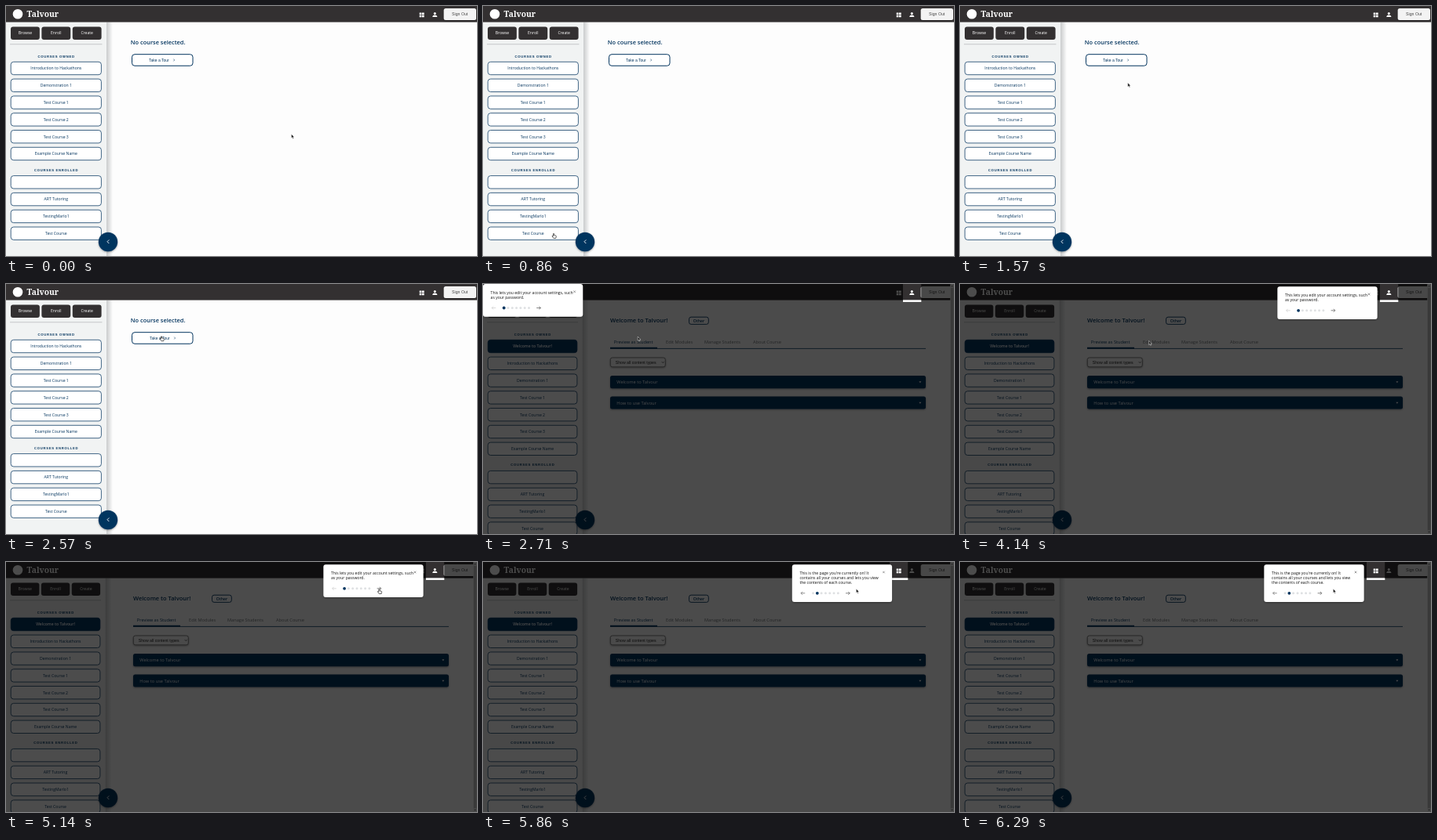
An HTML page that plays this animation: 600 px wide and 319 px high, repeating every 8000 ms.

```html
<!DOCTYPE html>
<html lang="en">
<head>
<meta charset="utf-8">
<title>Course tour</title>
<style>
  html, body { margin: 0; width: 100%; height: 100%; overflow: hidden; background: #fdfdfd; }
  svg { display: block; width: 100vw; height: 100vh; }
  text { font-family: "Open Sans", "Noto Sans", sans-serif; white-space: pre; }
  .arial { font-family: "Liberation Sans", Arial, sans-serif; }
  .brand { font-family: "Noto Serif", serif; font-weight: 700; }
  .head { font-weight: 700; letter-spacing: .7px; }
  .bold { font-weight: 600; }
</style>
</head>
<body>
<svg id="stage" viewBox="0 0 600 319" preserveAspectRatio="none" xmlns="http://www.w3.org/2000/svg"></svg>
<script>
const NAVY = '#04355f', DARK = '#333031', LOOP = 8000, STEP = 1000 / 7;
const stage = document.getElementById('stage');

const rect = (x, y, w, h, fill, r = 0, extra = '') =>
  `<rect x="${x}" y="${y}" width="${w}" height="${h}" rx="${r}" fill="${fill}" ${extra}/>`;
const line = (d, color, w = .7) =>
  `<path d="${d}" fill="none" stroke="${color}" stroke-width="${w}"/>`;
// y is the middle of the line of text
const text = (s, x, y, size, fill, cls = '', anchor = 'start') =>
  `<text x="${x}" y="${y + size * .36}" font-size="${size}" fill="${fill}" class="${cls}" text-anchor="${anchor}">${s}</text>`;
const mid = (s, x, y, size, fill, cls) => text(s, x, y, size, fill, cls, 'middle');
const group = (id, body) => `<g id="${id}">${body}</g>`;

const owned = ['Introduction to Hackathons', 'Demonstration 1', 'Test Course 1',
  'Test Course 2', 'Test Course 3', 'Example Course Name'];
const enrolled = ['', 'ART Tutoring', 'TestingMarlo1', 'Test Course'];

function header(signW) {
  const squares = [[526.7, 8.5], [530, 8.5], [526.7, 11.7], [530, 11.7]]
    .map(([x, y]) => rect(x, y, 2.7, 2.6, '#fff')).join('');
  return rect(0, 0, 600, 20.6, DARK) +
    '<circle cx="15" cy="10.3" r="6.3" fill="#fff"/>' +
    text('Talvour', 26.5, 10.3, 10.2, '#fff', 'brand') + squares +
    '<circle cx="546.3" cy="9.6" r="1.5" fill="#fff"/>' +
    '<path d="M543.3 14v-.8q.3-1.6 3-1.6t3 1.6v.8z" fill="#fff"/>' +
    rect(557.7, 3, signW, 15, '#f3f3f3', 2.5, 'filter="url(#soft)"') +
    mid('Sign Out', 578.2, 10.4, 5.2, '#444', 'arial');
}

function sidebar(width, courses, active) {
  const w = width - 12.4, cx = 6 + w / 2, pitch = 21.8;
  const bw = (w - 5) / 3;
  let s = rect(width, 20.6, 8, 299, 'url(#edge)') + rect(0, 20.6, width, 299, '#f1f3f3');
  ['Browse', 'Enroll', 'Create'].forEach((name, i) => {
    const x = 6 + i * (bw + 2.5);
    s += rect(x, 26.4, bw, 16.6, DARK, 3) + mid(name, x + bw / 2, 34.6, 5.1, '#fff');
  });
  s += line(`M5 48.8H${width - 5.5}`, '#b9bcbe', .8);
  const item = (name, y) => {
    const on = name === active;
    s += rect(6.2, y - 8.2, w - .4, 16.4, on ? NAVY : '#fff', 3.5, `stroke="${NAVY}" stroke-width=".75"`) +
      mid(name, cx, y, 5.1, on ? '#fff' : NAVY, on ? 'bold' : '');
  };
  let y = 79.5;
  s += mid('COURSES OWNED', cx + .3, 64, 4.2, NAVY, 'arial head');
  courses.forEach(c => { item(c, y); y += pitch; });
  s += mid('COURSES ENROLLED', cx + .3, y - 1.2, 4.2, NAVY, 'arial head');
  y += 14.5;
  enrolled.forEach(c => { item(c, y); y += pitch; });
  return s + `<circle cx="130" cy="301" r="12.2" fill="${NAVY}" filter="url(#soft)"/>` +
    line('M131.3 298.4L129 300.7L131.3 303', '#fff', .9);
}

function emptyPage() {
  return rect(0, 0, 600, 319, '#fdfdfd') + sidebar(128, owned) + header(41.3) +
    text('No course selected.', 158.8, 46, 7.4, NAVY, 'bold') +
    rect(160.5, 61.7, 77.5, 14.6, '#fff', 3.5, `stroke="${NAVY}"`) +
    group('tourLabel', text('Take a Tour', 182, 69, 5, NAVY, 'arial') +
      line('M213.4 67.6L214.7 69L213.4 70.4', NAVY, .6));
}

function coursePage() {
  const title = 'Welcome to Talvour!';
  const tabs = [['Preview as Student', 166.8], ['Edit Modules', 233], ['Manage Students', 282], ['About Course', 344]];
  const panel = (name, y) => rect(162, y, 402, 16.2, NAVY, 2.5, 'filter="url(#soft)"') +
    text(name, 170.3, y + 8.1, 5.7, '#fff') +
    `<path d="M555.4 ${y + 7.3}h3l-1.5 2z" fill="#fff"/>`;
  return rect(0, 0, 600, 319, '#fdfdfd') + sidebar(126.5, [title, ...owned], title) + header(39.3) +
    text(title, 162, 46, 7.5, NAVY, 'bold') +
    rect(262.5, 42.2, 24.8, 9.2, '#fff', 2.6, `stroke="${NAVY}" stroke-width=".9"`) +
    mid('Other', 274.9, 46.8, 5.1, NAVY, 'bold') +
    tabs.map(([s, x], i) => text(s, x, 74.2, 5.65, i ? '#6f7478' : NAVY)).join('') +
    line('M162 82.4H564', NAVY, .8) + line('M162 81.7H222', NAVY, 1.8) +
    rect(162.3, 94, 70, 11.8, '#f8f8f8', 2.5, 'stroke="#555" stroke-width=".7" filter="url(#soft)"') +
    text('Show all content types', 168.7, 99.9, 5.2, '#222', 'arial') +
    line('M227.8 99.2l1.4 1.4l1.4-1.4', '#222', .7) +
    panel('Welcome to Talvour', 117) + panel('How to use Talvour', 143.4) +
    rect(595.2, 0, 4.8, 319, '#f1f1f1') + rect(595.8, 5, 3.6, 309, '#c1c1c1') +
    '<path d="M596.4 3.3h2.4l-1.2-1.6zM596.4 315.8h2.4l-1.2 1.6z" fill="#555"/>';
}

function tip(lines, step, h) {
  const ny = h - 11.3;
  let s = rect(0, 0, 127.2, h, '#fff', 3, 'filter="url(#soft)"');
  lines.forEach((l, i) => { s += text(l, 9.6, 10.8 + i * 6, 5.07, '#111'); });
  s += line('M115.3 8.4l2.6 2.6m0-2.6l-2.6 2.6', '#555', .55);
  s += line(`M16.4 ${ny}h-5.2m2-2l-2 2l2 2`, step ? '#666' : '#ccc', .7);
  s += line(`M68.2 ${ny}h5.2m-2-2l2 2l-2 2`, '#555', .7);
  for (let i = 0; i < 7; i++) {
    const on = i === step;
    s += `<circle cx="${26.7 + i * 5.3}" cy="${ny}" r="${on ? 1.9 : 1.5}" fill="${on ? NAVY : '#dfe1e3'}"/>`;
  }
  return s;
}

stage.innerHTML = `<defs>
  <linearGradient id="edge"><stop offset="0" stop-color="#c9cbcc"/><stop offset="1" stop-color="#fdfdfd"/></linearGradient>
  <filter id="soft" x="-20%" y="-40%" width="140%" height="190%">
    <feDropShadow dx="0" dy="1" stdDeviation="1.3" flood-opacity=".35"/></filter></defs>` +
  group('empty', emptyPage()) +
  group('tour', coursePage() + '<path id="mask" fill="#000" fill-opacity=".7" fill-rule="evenodd"/>' +
    group('strip', rect(0, 20.6, 23.2, 2.2, '#fff')) +
    group('tip0', tip(['This lets you edit your account settings, such', 'as your password.'], 0, 41.8)) +
    group('tip1', tip(['This is the page you\'re currently on! It',
      'contains all your courses and lets you view', 'the contents of each course.'], 1, 47.8))) +
  group('arrow', '<path d="M0 0V5.2L1.2 4.1L2 6L2.9 5.6L2.1 3.8H3.7Z" fill="#111" stroke="#fff" stroke-width=".45"/>') +
  group('hand', '<path d="M-.6 .6Q0-.3 .6 .6V2.6L2.6 3Q3.5 3.2 3.3 4.2L2.8 6.3H-.1L-1.9 3.9Q-2 3 -1.2 3.3L-.6 3.9Z" fill="#fff" stroke="#111" stroke-width=".65"/>');

const el = id => document.getElementById(id);
const [empty, tour, mask, strip, tip0, tip1, arrow, hand, tourLabel] =
  ['empty', 'tour', 'mask', 'strip', 'tip0', 'tip1', 'arrow', 'hand', 'tourLabel'].map(el);
const show = (node, on) => node.setAttribute('display', on ? 'inline' : 'none');
const move = (node, x, y) => node.setAttribute('transform', `translate(${x} ${y})`);
const clamp = u => Math.max(0, Math.min(1, u));
const easeOut = u => 1 - (1 - u) ** 2.4;
const smooth = u => u * u * (3 - 2 * u);

// Two sweeps around the page, ending on the tour button
const sweep = [[363.5, 163.5], [340, 84], [250, 45], [130, 62], [50, 130], [36, 215], [90, 290], [200, 306],
  [320, 262], [362, 180], [300, 112], [213.7, 98], [120, 130], [65, 205], [110, 301], [190, 180], [198, 66.4]];

function pointer(n) {
  if (n < 19) {
    const [x, y] = sweep[Math.min(n, 16)];
    return { x, y, hand: x < 121 || n >= 16 };
  }
  const e = smooth(clamp((n - 27) / 8));
  return {
    x: 197.2 + 278.2 * e,
    y: 67.2 - 33 * e + 22 * Math.sin(Math.PI * e),
    hand: n >= 35 && n < 41
  };
}

function draw(ms) {
  const n = Math.floor((ms % LOOP + 4) / STEP);
  const touring = n >= 19, second = n >= 40;
  show(empty, !touring);
  show(tour, touring);
  move(tourLabel, n >= 16 ? .9 : 0, 0);

  const hx = second ? 518 : 535;
  mask.setAttribute('d', `M0 0H600V319H0ZM${hx} 0h23.2v22.8h-23.2Z`);
  move(strip, hx, 0);
  show(tip0, !second);
  show(tip1, second);
  const enter = easeOut(clamp((n - 19) / 2));
  move(tip0, 404.4 * enter, 3.3 * enter);
  move(tip1, 404.4 - 17 * easeOut(clamp((n - 40) / 3)), 3.3);

  const p = pointer(n);
  show(arrow, !p.hand);
  show(hand, p.hand);
  move(p.hand ? hand : arrow, p.x, p.y);
}

const start = performance.now();
function tick() {
  draw(performance.now() - start);
  requestAnimationFrame(tick);
}
tick();
</script>
</body>
</html>
```
